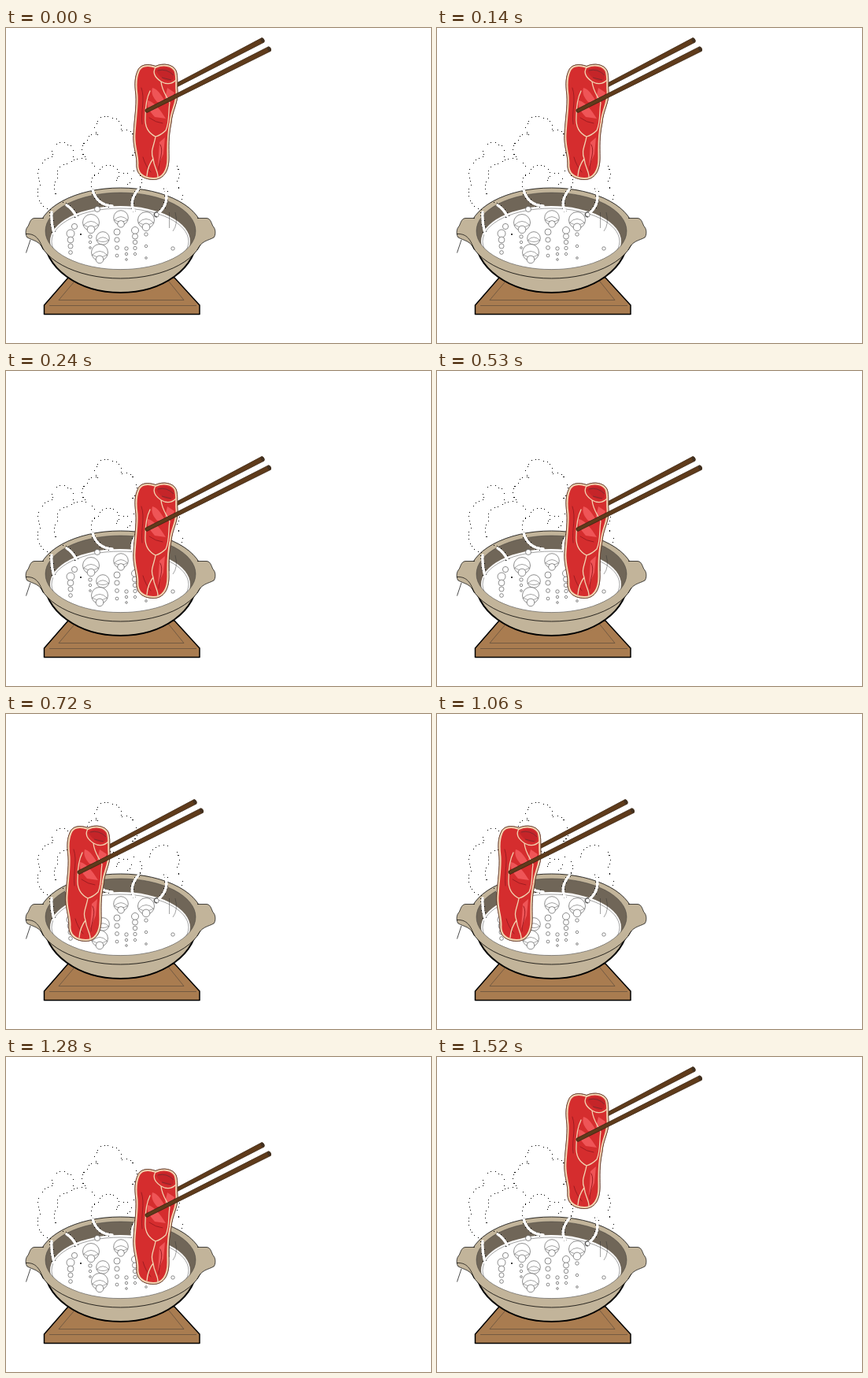
Animation, 540 px wide and 400 px high, one loop 1600 ms. Source, as an HTML page:

```html
<!DOCTYPE html>
<html lang="en">
<head>
<meta charset="utf-8">
<title>Hot pot</title>
<style>
  html, body { margin: 0; width: 100%; height: 100%; overflow: hidden; background: #fff; }
  svg { display: block; width: 100vw; height: 100vh; }
  .line { fill: none; stroke: #000; stroke-width: .7; }
  .thin { fill: none; stroke: #333; stroke-width: .45; }
  .dots { fill: none; stroke: #000; stroke-dasharray: 1 3 1 5 1 4; shape-rendering: crispEdges; }
  .wisp { fill: none; stroke: #fff; stroke-width: 3.4; stroke-linecap: round; }
  .bubble { fill: #fff; stroke: #333; stroke-width: .55; }
  .fat { fill: none; stroke: #f2d3b0; stroke-width: 1.3; stroke-linecap: round; stroke-linejoin: round; }
</style>
</head>
<body>
<svg viewBox="0 0 540 400">
  <defs>
    <clipPath id="inside"><ellipse cx="145.5" cy="257.8" rx="95.5" ry="48.8"/></clipPath>
    <path id="handle" d="M48 241.500 H36 C30 242 30 250 27 253 C24 257 25 264 27 266 C34 270 43 270 48 282"
      fill="#c2b49a" stroke="#000" stroke-width=".7"/>
  </defs>

  <g id="board" stroke="#000" stroke-linejoin="round">
    <path d="M79 317 L48.500 352 V363.500 H246 V352 L214 317Z" fill="#a97c50" stroke-width="1.5"/>
    <path class="thin" d="M91 317 L67 345.500 H226 L203 317 M55 352.500 H242"/>
  </g>

  <g id="pot">
    <path d="M48.500 266 A97 70 0 0 0 242.500 266Z" fill="#c2b49a" stroke="#000" stroke-width="2"/>
    <ellipse cx="145.5" cy="260.5" rx="105" ry="57.500" fill="#c2b49a" stroke="#000" stroke-width=".8"/>
    <use href="#handle"/>
    <use href="#handle" transform="translate(291 0) scale(-1 1)"/>
    <path class="line" d="M25 261.500 C36 261 42 266 47 281 M31 269 L25.500 285.500"/>
    <g clip-path="url(#inside)">
      <rect x="48" y="207" width="196" height="101" fill="#706658"/>
      <ellipse cx="145" cy="271" rx="89" ry="45" fill="#fff"/>
      <ellipse class="thin" cx="145" cy="271" rx="87" ry="42"/>
    </g>
    <ellipse class="thin" cx="145.5" cy="257.8" rx="95.5" ry="48.8"/>
    <path class="thin" d="M207.500 234 V254 M215 234 Q219 249 212 258"/>
  </g>

  <g id="bubbles"></g>
  <g id="steam"></g>

  <g id="bite">
    <g id="back"></g>
    <path id="cut" d="M167 55 C170 46 180 45 190 48.500 C200 44 212 46 216 54 C219 62 217 72 218 80 C219 95 211 105 210 120
      C206 140 207 150 207 165 C207 182 200 192.500 187 192.500 C172 192 165 184 166 172 C166 160 161 150 162 135
      C163 115 166 100 165 85 C163 70 164 62 167 55Z" fill="#d52d2e" stroke="#5a3323" stroke-width=".9"/>
    <path d="M186 76 C194 78 199 88 203 95 L192 94 C187 88 184 83 186 76Z M180 92 C189 94 196 104 203 115 L189 113 C183 106 178 100 180 92Z
      M205 76 L214 82 C211 91 205 94 202 89Z M195 145 L202 139 L200 160 L193 176Z" fill="#ef5557"/>
    <path d="M190 54 C200 48 211 50 213 57 L213 65 C206 70 198 66 190 54Z" fill="#c52529"/>
    <path d="M172 76 C177 91 171 104 173 122 M182 114 Q190 120 199 121 M196 148 C201 157 194 168 194 180 M174 164 Q177 175 184 183"
      fill="none" stroke="#9f1c21" stroke-linecap="round"/>
    <path class="fat" d="M190 50 C185 58 191 64 197 68 C204 72 211 71 216 66 M197 68 C198 80 204 86 208 95 C206 107 208 119 203 130
      Q197 136 190 138 C182 134 176 126 177 113 Q177 92 183 80 M190 138 C188 150 183 156 187 166 C188 177 193 181 193 189 M187 166 Q180 175 179 188"/>
    <path class="thin" d="M193 54 Q204 51 213 60 M198 63 L210 66"/>
    <g id="front"></g>
  </g>
</svg>
<script>
const $ = id => document.getElementById(id);

function add(parent, tag, attrs) {
  const el = document.createElementNS('http://www.w3.org/2000/svg', tag);
  for (const key in attrs) el.setAttribute(key, attrs[key]);
  parent.appendChild(el);
  return el;
}

function bubble(cx, cy, r) {
  add($('bubbles'), 'circle', { class: 'bubble', cx, cy, r });
}

// Large bubble with a lens inside and, if big enough, a small one below
function dome(x, y, r) {
  bubble(x, y, r);
  const w = r * .9, h = y + r * .3;
  add($('bubbles'), 'path', {
    class: 'thin', d: `M${x - w} ${h} Q${x} ${h - r * .9} ${x + w} ${h} Q${x} ${h + r * .5} ${x - w} ${h}`
  });
  if (r > 9) bubble(x, y + r * .85, r * .46);
}

// Rising string of bubbles, smaller towards the bottom
function column(x, y, count, gap, r) {
  for (let i = 0; i < count; i++) bubble(x, y + i * gap, r * .78 ** i);
}

// Joins points with round clockwise bulges
function puff(...points) {
  let [x, y] = points[0];
  let d = `M${x} ${y}`;
  for (const [nx, ny] of points.slice(1)) {
    const r = Math.hypot(nx - x, ny - y) * .6;
    d += ` A${r} ${r} 0 0 1 ${nx} ${ny}`;
    [x, y] = [nx, ny];
  }
  add($('steam'), 'path', { class: 'dots', d });
}

function wisp(d) {
  add($('steam'), 'path', { class: 'dots', 'stroke-width': 5, d });
  add($('steam'), 'path', { class: 'wisp', d });
}

// Tapered stick with a dark cap on the thick end
function stick(parent, x1, y1, x2, y2) {
  const len = Math.hypot(x2 - x1, y2 - y1);
  const angle = Math.atan2(y2 - y1, x2 - x1) * 180 / Math.PI;
  const g = add(parent, 'g', { transform: `translate(${x1} ${y1}) rotate(${angle})` });
  add(g, 'path', {
    d: `M0 -2.2 L${len} -3.1 Q${len + 2.5} 0 ${len} 3.1 L0 2.2 Q-2 0 0 -2.2Z`,
    fill: '#5f3b1b', stroke: '#38220f', 'stroke-width': .7
  });
  add(g, 'ellipse', { cx: len - .5, cy: 0, rx: 2.2, ry: 3, fill: '#42301f' });
}

dome(108, 247, 10.5);
dome(146, 241, 9.3);
dome(178, 244, 10.5);
dome(123, 267, 8.3);
dome(119, 285, 10.5);

column(82, 261, 4, 8, 5);
column(107, 265, 3, 7, 2.2);
column(141, 259, 4, 10, 4);
column(164, 257, 5, 7.5, 4.5);
column(153, 280, 3, 7, 2.2);
column(178, 262, 3, 15, 2.2);
bubble(87, 252, 3.6);
bubble(116, 230, 3.5);
bubble(191, 237, 3.2);
bubble(212, 280, 2.2);
add($('bubbles'), 'circle', { cx: 95, cy: 262, r: 1 });

puff([57, 231], [44, 198], [61, 163], [62, 152], [78, 148], [84, 160], [80, 171]);
puff([77, 223], [66, 190], [80, 172], [114, 178]);
puff([101, 164], [103, 143], [118, 136], [116, 121], [132, 114], [146, 131], [163, 140], [158, 163]);
puff([111, 205], [118, 184], [137, 176], [140, 194], [158, 186], [154, 199]);
puff([162, 181], [169, 204]);
puff([182, 182], [211, 170], [213, 200], [222, 220]);

wisp('M58 234 Q57 249 62 263');
wisp('M77 225 Q84 229 90 240');
wisp('M110 206 Q116 225 135 226');
wisp('M168 205 Q154 222 165 236');
wisp('M202 203 Q208 222 195 234');
add($('steam'), 'path', { class: 'line', d: 'M193 234 Q189 233 188.500 237 Q189 240 192 240' });

// Rim of fat: the outline again, clipped to itself
const cut = $('cut').getAttribute('d');
add(add(document.querySelector('defs'), 'clipPath', { id: 'flesh' }), 'path', { d: cut });
const rim = add($('bite'), 'path', { class: 'fat', d: cut, style: 'stroke-width: 5', 'clip-path': 'url(#flesh)' });
$('cut').before(rim);
rim.before($('cut'));
add($('bite'), 'path', { class: 'line', d: cut, style: 'stroke: #5a3323' });
$('bite').append($('front'));

stick($('back'), 213, 74.5, 326.5, 15.3);
stick($('front'), 178, 105.5, 335, 26.5);

const LOOP = 1600;
const RAISED = [0, 0], DIPPED = [0, 96], SWISHED = [-86, 96];

function pose(t) {
  if (t < 240 || t >= 1520) return RAISED;
  return t >= 720 && t < 1280 ? SWISHED : DIPPED;
}

function draw(ms) {
  $('bite').setAttribute('transform', `translate(${pose(ms % LOOP)})`);
}

const start = performance.now();
function tick() {
  draw(performance.now() - start);
  requestAnimationFrame(tick);
}
tick();
</script>
</body>
</html>
```
